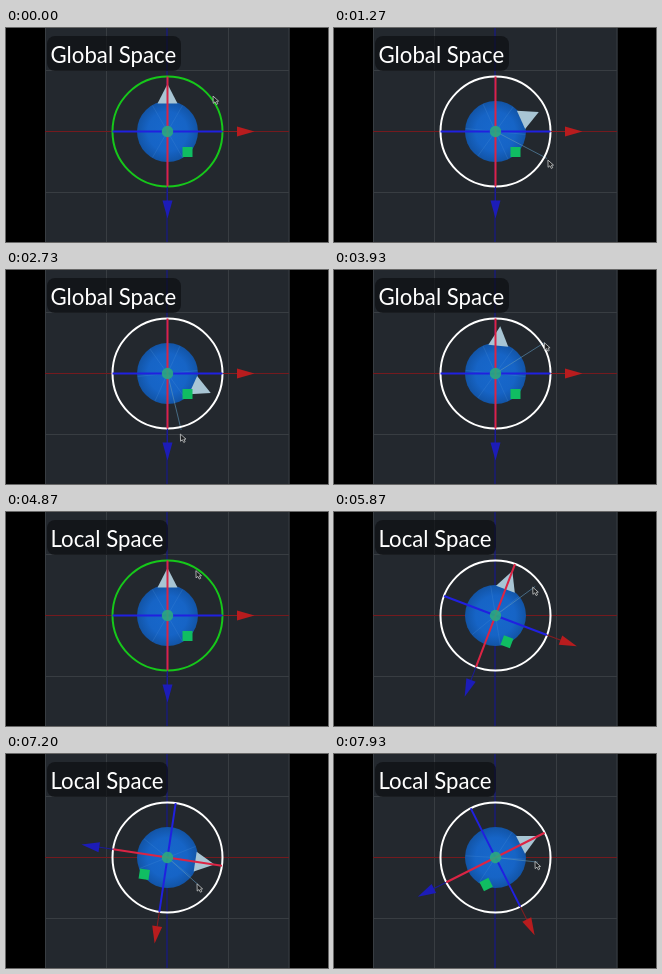
An HTML page that plays this animation: 322 by 214 pixels, repeating every 8 s.

```html
<!DOCTYPE html>
<html lang="en">
<head>
<meta charset="utf-8">
<title>Rotation gizmo</title>
<style>
  html, body { margin: 0; width: 100%; height: 100%; overflow: hidden; background: #000; }
  svg { display: block; width: 322px; height: 214px; }
  text { font: 22.2px Lato, "Open Sans", sans-serif; fill: #fff; }
</style>
</head>
<body>
<svg viewBox="0 0 322 214">
  <defs>
    <radialGradient id="ball">
      <stop offset="0" stop-color="#1768cc"/>
      <stop offset=".65" stop-color="#1664c6"/>
      <stop offset="1" stop-color="#1254a6"/>
    </radialGradient>
  </defs>
  <rect x="39" width="244.5" height="214" fill="#23282e"/>
  <path d="M39.5 0V214M100.5 0V214M222.5 0V214M283 0V214M39 42.5H283M39 164.5H283" stroke="#383d42"/>
  <path d="M39 103.5H283" stroke="#741a1e"/>
  <path d="M161 0V214" stroke="#14149a"/>

  <g transform="translate(161.5 103.5)">
    <circle r="30.5" fill="url(#ball)"/>
    <g id="body">
      <path d="M-15 -26L15 26M-30 0H30M-15 26L15 -26" stroke="#4a8fd8" stroke-width=".7" opacity=".35"/>
      <path d="M0 -47.5L10 -28H-10Z" fill="#a8c5d4"/>
    </g>
    <line id="grab" stroke="#5d93b8" stroke-width=".9" opacity=".7"/>
    <circle id="ring" r="55" fill="none" stroke-width="2"/>
    <g id="gizmo">
      <path d="M55 0H70" stroke="#8a1c20"/>
      <path d="M0 55V70" stroke="#1b1b96"/>
      <path d="M87 0L69.5 -5V5Z" fill="#b81c1e"/>
      <path d="M0 87L-5 69H5Z" fill="#1c1cb8"/>
      <rect x="15" y="15.5" width="10" height="10" fill="#10bd62"/>
      <path d="M-55 0H55" stroke="#2020e0" stroke-width="2"/>
      <path d="M0 -55V55" stroke="#dc2444" stroke-width="2"/>
      <circle r="5.7" fill="#2aa880" opacity=".9"/>
    </g>
  </g>

  <path id="cursor" d="M0 0L.2 7.2L2 5.7L3.4 8.4L4.8 7.6L3.5 5.2L5.6 5Z" fill="#1c1e20" stroke="#c9cccc" stroke-width=".8"/>
  <rect id="plate" x="41" y="8" height="35" rx="8" fill="#0b0d10" opacity=".65"/>
  <text id="label" x="44.5" y="34.5"></text>
</svg>
<script>
const LOOP = 8000, STEP = 1000 / 15;
const el = id => document.getElementById(id);

const progress = (t, from, to) => Math.min(1, Math.max(0, (t - from) / (to - from)));
const easeOut = u => Math.sin(u * Math.PI / 2);
const easeInOut = u => (1 - Math.cos(u * Math.PI)) / 2;
const mix = (a, b, u) => a + (b - a) * u;

// One drag: turn out to the peak, then back towards zero
const swing = (t, start, peak, end, degrees, ease) =>
  degrees * (ease(progress(t, start, peak)) - easeInOut(progress(t, peak, end)));

function polar(degrees, radius) {
  const a = degrees * Math.PI / 180;
  return [radius * Math.sin(a), -radius * Math.cos(a)];
}

function draw(t) {
  const local = t >= 4530;
  const dragging = t >= 130 && t < 4200 || t >= 5390;
  const angle = local
    ? swing(t, 5380, 7000, 9240, 100.5, easeInOut)
    : swing(t, 670, 2380, 4180, 126, easeOut);

  // Between the drags the pointer slides along the ring, later it drifts inwards
  const slide = easeInOut(progress(t, 4200, 4930));
  const lead = mix(53, 33, slide);
  const reach = mix(58, 53, slide) + (local ? -12.5 * easeOut(progress(t, 5400, 6900)) : angle * .04);
  const [x, y] = polar(angle + lead, reach);
  const [gx, gy] = polar(angle + lead - (local ? 0 : 1), local ? reach + 2 : 58);

  el("body").setAttribute("transform", `rotate(${angle})`);
  el("gizmo").setAttribute("transform", `rotate(${local ? angle : 0})`);
  el("cursor").setAttribute("transform", `translate(${160.7 + x} ${103 + y})`);
  el("grab").setAttribute("x2", gx);
  el("grab").setAttribute("y2", gy);
  el("grab").style.visibility = dragging && angle > 0 ? "visible" : "hidden";
  el("ring").setAttribute("stroke", dragging ? "#fff" : "#16c81a");
  el("plate").setAttribute("width", local ? 121 : 134);
  el("label").textContent = local ? "Local Space" : "Global Space";
}

const start = performance.now();
function tick() {
  const t = (performance.now() - start) % LOOP;
  draw(Math.floor(t / STEP + .05) * STEP);
  requestAnimationFrame(tick);
}
tick();
</script>
</body>
</html>
```
